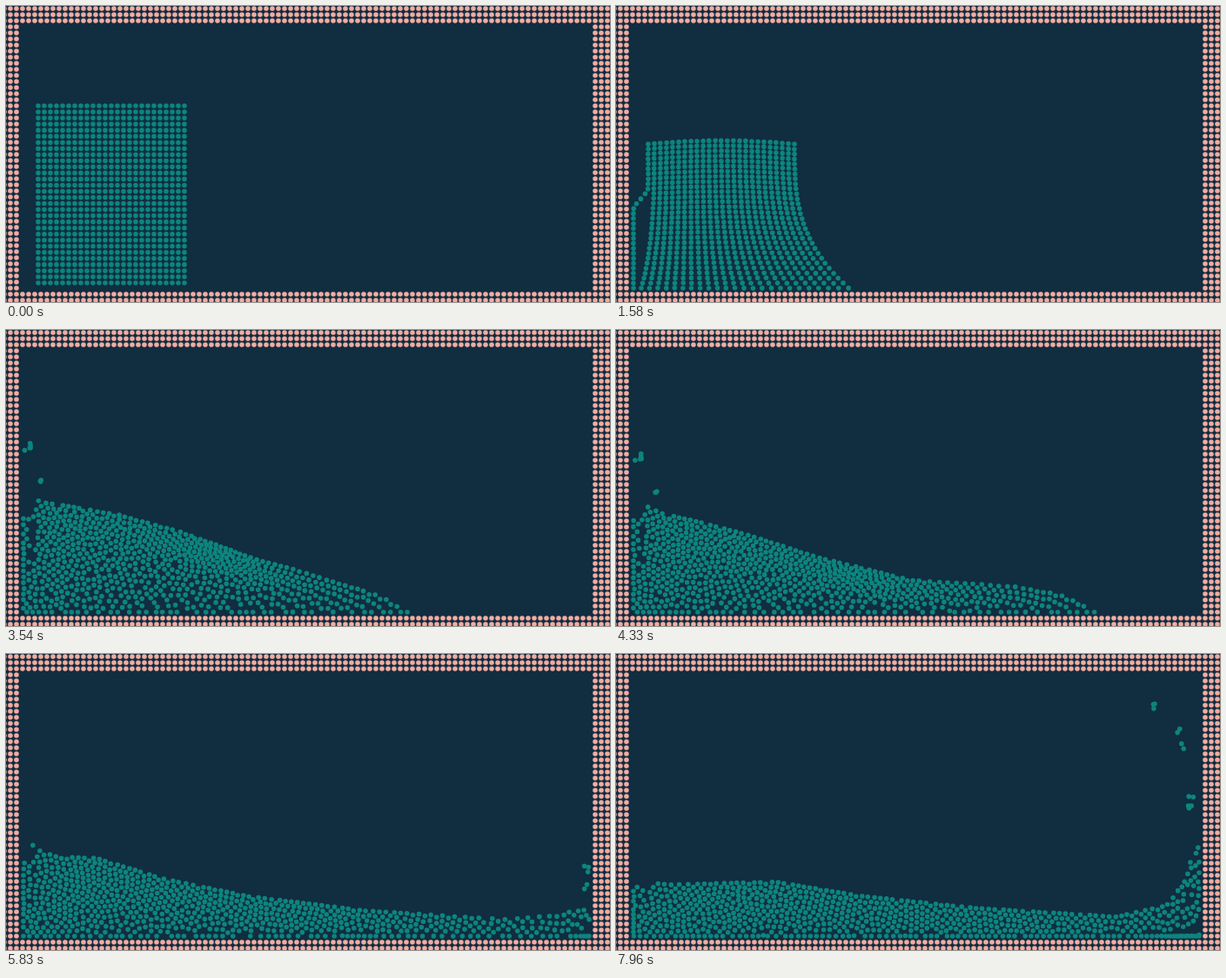
An HTML page with a canvas that plays this animation: 694 by 341 pixels, repeating every 8000 ms.

```html
<!DOCTYPE html>
<html lang="en">
<head>
<meta charset="utf-8">
<title>Dam break</title>
<style>
  html, body { margin: 0; width: 100%; height: 100%; overflow: hidden; background: #112d40; }
  canvas { display: block; }
</style>
</head>
<body>
<canvas id="stage" width="694" height="341"></canvas>
<script>
const ctx = document.getElementById('stage').getContext('2d');
const FPS = 24, FRAMES = 192, COLS = 25, ROWS = 30;
const LEFT = 20, RIGHT = 670, FLOOR = 325, GRAVITY = 32;
const COLLAPSE_END = 65;   // frame at which the flow along the floor takes over
const SPACING = 7;

const clamp = (v, lo, hi) => Math.min(hi, Math.max(lo, v));
const lerp = (a, b, k) => a + (b - a) * k;
const smooth = (a, b, v) => { const k = clamp((v - a) / (b - a), 0, 1); return k * k * (3 - 2 * k); };
let seed = 7;
const noise = () => (seed = (seed * 16807) % 2147483647) / 2147483647 - 0.5;

// Water surface at a few times (s): heights at fixed fractions between the left wall and the front.
const STOPS = [0, 0.06, 0.13, 0.25, 0.4, 0.6, 0.85, 0.94, 0.975, 1];
const SURFACES = [
  { t: 2.71, front: 372, y: [186, 187, 188, 190, 200, 240, 289, 303, 312, 324] },
  { t: 4.33, front: 552, y: [193, 212, 220, 237, 263, 289, 296, 302, 310, 324] },
  { t: 5.3, front: 672, y: [208, 227, 231, 253, 279, 295, 302, 307, 314, 322] },
  { t: 5.83, front: 672, y: [220, 234, 236, 260, 280, 296, 306, 301, 292, 275] },
  { t: 6.83, front: 672, y: [238, 253, 245, 260, 282, 294, 307, 295, 270, 215] },
  { t: 7.96, front: 672, y: [261, 266, 265, 263, 279, 293, 303, 290, 260, 185] }
];

// Ballistic clusters of drops: x, y, vx, vy at time t, and how many.
const cluster = (t, x, y, vx, vy, count) => Array.from({ length: count }, () => ({
  t, x: x + noise() * 8, y: y + noise() * 10, vx: vx + noise() * 2, vy: vy + noise() * 3
}));
const SPRAY = [
  cluster(2.71, 25, 144, 1, -24, 5),
  cluster(2.71, 30, 179, 8, -23, 3),
  cluster(6.83, 643, 141, -23, -90, 3),
  cluster(6.83, 655, 168, -9, -86, 2),
  cluster(6.83, 661, 187, -9, -90, 2),
  cluster(6.83, 666, 212, -6, -60, 2),
  cluster(6.83, 664, 232, -6, -67, 3)
].flat();

// Surface height and normalised cumulative area for every pixel column.
function profile(t) {
  let k = 0;
  while (k < SURFACES.length - 2 && t > SURFACES[k + 1].t) k++;
  const a = SURFACES[k], b = SURFACES[k + 1];
  const mix = clamp((t - a.t) / (b.t - a.t), 0, 1);
  const front = lerp(a.front, b.front, mix);
  const ys = a.y.map((y, i) => lerp(y, b.y[i], mix));
  const height = [], area = [0];
  for (let x = LEFT, i = 0; x <= 672; x++) {
    const s = (x - LEFT) / (front - LEFT);
    while (i < STOPS.length - 2 && s > STOPS[i + 1]) i++;
    const y = s > 1 ? FLOOR : lerp(ys[i], ys[i + 1], (s - STOPS[i]) / (STOPS[i + 1] - STOPS[i]));
    height.push(y);
    area.push(area[area.length - 1] + FLOOR - y);
  }
  const total = area[area.length - 1];
  return { height, area: area.map(v => v / total) };
}

const heightAt = (p, x) => p.height[clamp(Math.round(x - LEFT), 0, p.height.length - 1)];

function areaAt(p, x) {
  const k = Math.floor(x - LEFT);
  return lerp(p.area[k], p.area[k + 1], x - LEFT - k);
}

function xAtArea(p, f) {
  let lo = 0, hi = p.area.length - 1;
  while (lo < hi) {
    const mid = (lo + hi) >> 1;
    if (p.area[mid] < f) lo = mid + 1; else hi = mid;
  }
  if (!lo) return LEFT;
  return LEFT + lo - 1 + (f - p.area[lo - 1]) / (p.area[lo] - p.area[lo - 1]);
}

// The block drops freely, then its foot spreads to both sides.
function collapse(t, jitter) {
  const late = Math.max(0, t - 1.58);
  const base = Math.min(FLOOR, 319 + GRAVITY / 2 * t * t);
  const top = late ? 155 + 45 * late - 14.7 * late * late : 115 + GRAVITY / 2 * t * t;
  const sag = 35 * (late / 1.13) ** 1.5;
  const reach = 62 * (t / 1.58) ** 1.8;
  const curl = 3 - 1.77 * (t - 1.58);
  const grip = Math.min(1, (t / 1.5) ** 2);
  const bulge = 0.3 - late * 0.2;
  const rough = 2 * (t / 2.71) ** 3;
  return jitter.map(([nx, ny], n) => {
    const col = n % COLS, u = col / (COLS - 1);
    const v = Math.floor(n / COLS) / (ROWS - 1), w = 1 - v;
    const pull = col ? (1 - u) ** 3 * w ** curl : smooth(bulge, bulge + 0.16, w);
    const dome = 4 * grip * v * (2 * u - 1) ** 2;
    return {
      x: Math.max(LEFT, 37 + 168 * u - 17 * grip * pull + reach * u ** 1.8 * w ** curl + nx * rough),
      y: Math.min(FLOOR, base - v * (base - top - sag * u ** 2.5) + dome + ny * rough)
    };
  });
}

// Carry every particle along with the changing surface, keeping its share of area and depth.
function advect(dots, from, to) {
  return dots.map(({ x, y }) => {
    const depth = (FLOOR - y) / Math.max(0.5, FLOOR - heightAt(from, x));
    const nx = clamp(xAtArea(to, areaAt(from, x)), LEFT, RIGHT);
    return { x: nx, y: FLOOR - Math.min(depth, 1.3) * (FLOOR - heightAt(to, nx)) };
  });
}

function relax(dots, p) {
  for (let i = 0; i < dots.length; i++) {
    const a = dots[i];
    for (let j = 0; j < i; j++) {
      const b = dots[j], dx = a.x - b.x;
      if (dx > SPACING || dx < -SPACING) continue;
      const dy = a.y - b.y, d = Math.sqrt(dx * dx + dy * dy) + 0.01;
      if (d >= SPACING) continue;
      const push = 0.13 * (SPACING - d) / d;
      a.x += dx * push; a.y += dy * push;
      b.x -= dx * push; b.y -= dy * push;
    }
  }
  for (const d of dots) {
    d.x = clamp(d.x + noise() * 0.2, LEFT, RIGHT);
    d.y = Math.min(FLOOR, d.y + noise() * 0.2);
    if (d.y > 321) d.y = lerp(d.y, FLOOR, 0.4);
    const surface = heightAt(p, d.x);
    if (d.y < surface) d.y = lerp(d.y, surface, 0.3);
  }
}

function spray(t, p) {
  return SPRAY.map(d => {
    const s = t - d.t;
    return { x: clamp(d.x + d.vx * s, LEFT, RIGHT), y: d.y + d.vy * s + GRAVITY / 2 * s * s };
  }).filter(d => d.y < heightAt(p, d.x));
}

function bake() {
  const jitter = Array.from({ length: COLS * ROWS }, () => [noise(), noise()]);
  const frames = [];
  let dots, previous;
  for (let f = 0; f < FRAMES; f++) {
    const t = f / FPS, p = profile(t);
    if (f <= COLLAPSE_END) {
      dots = collapse(t, jitter);
    } else {
      dots = advect(dots, previous, p);
      relax(dots, p);
      relax(dots, p);
    }
    previous = p;
    frames.push(dots.map(d => ({ ...d })).concat(spray(t, p)));
  }
  return frames;
}

const wall = [];
for (let x = -2; x < 697; x += 7)
  for (let y = 3; y < 344; y += 7)
    if (x < 15 || x > 674 || y < 20 || y > 329) wall.push({ x, y });

function fillDots(dots, color, r) {
  ctx.fillStyle = color;
  ctx.beginPath();
  for (const { x, y } of dots) {
    ctx.moveTo(x + r, y);
    ctx.arc(x, y, r, 0, Math.PI * 2);
  }
  ctx.fill();
}

const frames = bake();

function draw() {
  const f = Math.floor((performance.now() % 8000) * FPS / 1000 + 0.1) % FRAMES;
  ctx.fillStyle = '#112d40';
  ctx.fillRect(0, 0, 694, 341);
  fillDots(wall, '#f3aca1', 2.8);
  fillDots(frames[f], '#0c857d', 2.8);
  requestAnimationFrame(draw);
}
draw();
</script>
</body>
</html>
```
